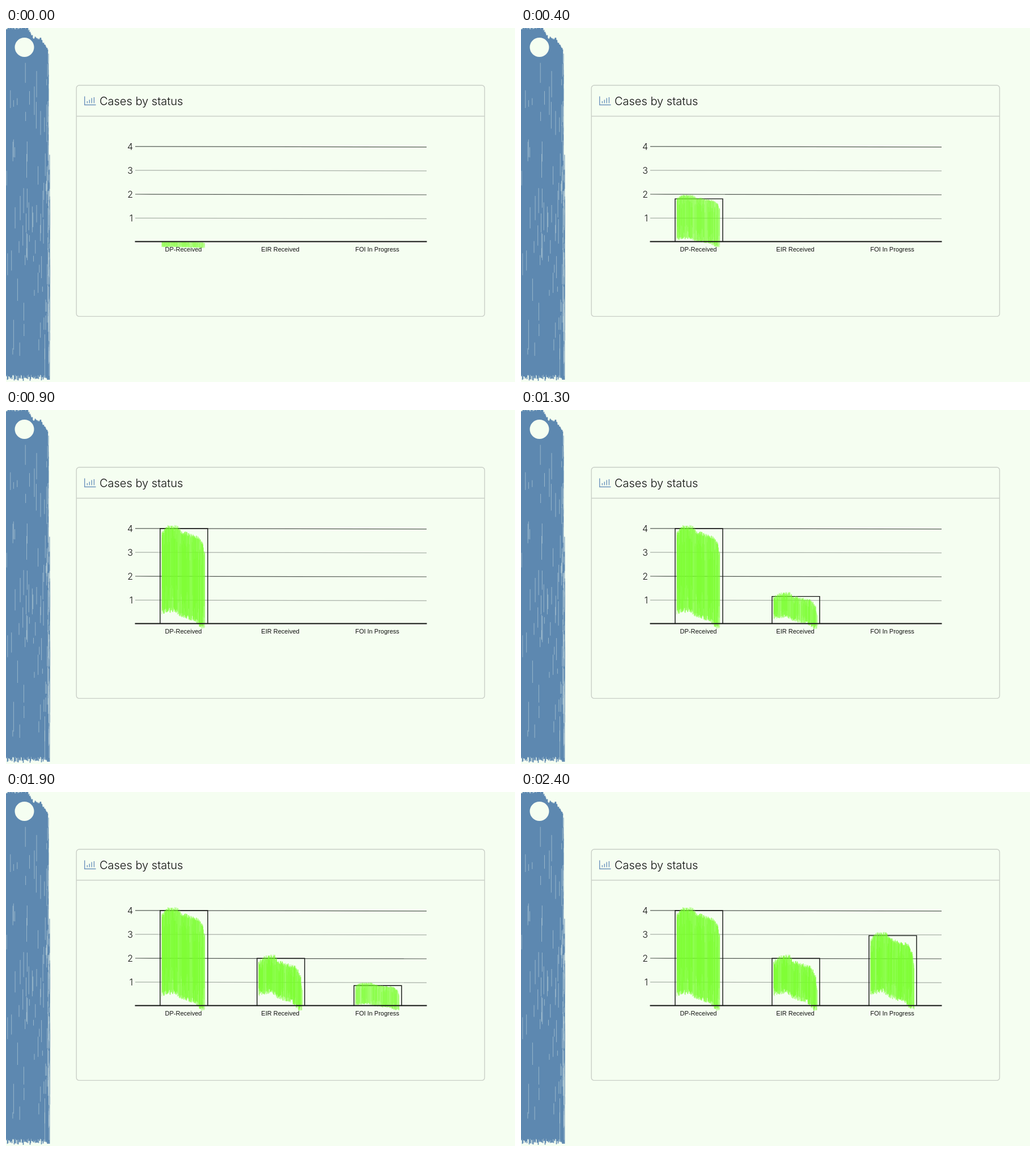
An HTML page for the animation above (2.5 s loop, 898 by 624 pixels).

```html
<!DOCTYPE html>
<html lang="en">
<head>
<meta charset="utf-8">
<title>Cases by status</title>
<style>
  html, body { margin: 0; width: 100%; height: 100%; overflow: hidden; background: #f5fef1; }
  svg { display: block; width: 898px; height: 624px; }
  .title, .axis { font-family: Inter, "Liberation Sans", sans-serif; font-weight: 300; fill: #111; }
  .title { font-size: 20px; }
  .axis { font-size: 16px; text-anchor: end; }
  .label { font: 11px "Liberation Sans", Arial, sans-serif; fill: #111; text-anchor: middle; }
  .card { fill: none; stroke: #c9cfc7; stroke-width: 1.4; }
  .icon { fill: none; stroke: #6c92bd; stroke-width: 1.4; }
  .outline { fill: none; stroke: #111; stroke-width: 1.4; }
  .base { stroke: #111; stroke-width: 2.2; }
</style>
</head>
<body>
<svg viewBox="0 0 898 624">
  <g id="sidebar"></g>
  <circle cx="32.5" cy="34" r="17" fill="#f5fef1"/>

  <rect class="card" x="124.2" y="101" width="720.2" height="407.4" rx="5"/>
  <path class="card" d="M124 155.5H844.4"/>
  <path class="icon" d="M138.7 120.5V135.5H158.5M143.4 129V132.5M147.3 126.5V132.5M151.2 123.5V132.5M155.4 122V132.5"/>
  <text class="title" x="165" y="136">Cases by status</text>

  <g id="grid"></g>
  <g id="labels"></g>
  <g id="bars"></g>
  <path class="base" d="M227.5 376.5H742.5"/>
</svg>
<script>
const LOOP = 2500, STEP = 100, FLOOR = 376.5, PITCH = 171;
const GREEN = '#78ff2b', BLUE = '#5d88b0', PAPER = '#f5fef1';
const $ = id => document.getElementById(id);

function add(parent, tag, attrs, text) {
  const el = document.createElementNS('http://www.w3.org/2000/svg', tag);
  for (const key in attrs) el.setAttribute(key, attrs[key]);
  if (text) el.textContent = text;
  parent.appendChild(el);
  return el;
}

function seeded(seed) {
  return () => {
    seed = (seed * 1664525 + 1013904223) >>> 0;
    return seed / 4294967296;
  };
}

const clamp = v => Math.max(0, Math.min(1, v));
const segment = (x, y1, y2) => `M${x.toFixed(1)} ${y1.toFixed(1)}V${y2.toFixed(1)}`;

// Piecewise linear curve through [x, y] points
function curve(points, x) {
  let i = 1;
  while (i < points.length - 1 && points[i][0] < x) i++;
  const [x0, y0] = points[i - 1], [x1, y1] = points[i];
  return y0 + (y1 - y0) * clamp((x - x0) / (x1 - x0));
}

function drawSidebar() {
  const rnd = seeded(11), g = $('sidebar');
  const top = [[0, 4], [3, 0], [38, 0], [48, 16], [62, 19], [74, 38]];
  let body = '', fringe = '', streaks = '';
  for (let x = 0.5; x < 74; x++) {
    body += segment(x, curve(top, x) + rnd() * 5 - 2, 611 + rnd() * 11);
  }
  for (let i = 0; i < 90; i++) {
    const y = 40 + rnd() * 560;
    const reach = y > 220 ? 4 : 2;
    fringe += segment(73 + rnd() * reach, y, Math.min(620, y + 20 + rnd() * 120));
  }
  // Dry streaks crowd towards the right edge
  for (let i = 0; i < 130; i++) {
    const y = 40 + rnd() * 530;
    streaks += segment(76 * (1 - rnd() ** 4), y, y + 8 + rnd() * 45);
  }
  add(g, 'path', { d: body, stroke: BLUE, 'stroke-width': 1.6 });
  add(g, 'path', { d: fringe, stroke: BLUE, 'stroke-width': 1 });
  add(g, 'path', { d: streaks, stroke: PAPER, 'stroke-width': 0.6, opacity: 0.65 });
}

function drawGrid() {
  for (let n = 1; n <= 4; n++) {
    const y = FLOOR + 0.7 - n * 42.1, dark = n % 2 === 0;
    add($('grid'), 'path', {
      d: `M228 ${y}L742 ${y + 1}`,
      stroke: dark ? '#555a55' : '#a9b0a8', 'stroke-width': 1.2
    });
    add($('grid'), 'text', { class: 'axis', x: 224, y: y + 5.8 }, String(n));
  }
  ['DP-Received', 'EIR Received', 'FOI In Progress'].forEach((name, i) =>
    add($('labels'), 'text', { class: 'label', x: 313 + i * PITCH, y: 394 }, name));
}

// Brush outline: [part of the width, pixels below the peak or above the foot]
const BRUSH_TOP = [[0, 12], [0.13, 1], [0.36, 0], [0.45, 10], [0.85, 20], [0.95, 36], [1, 70]];
const BRUSH_FOOT = [[0, 30], [0.28, 35], [0.45, 24], [0.75, 18], [0.9, 4], [1, 4]];
const BRUSH_WIDTH = 78;

// show: first visible time; brush and frame: start and end of growth
const bars = [
  { height: 167.5, foot: 388, show: 0, brush: [0, 840], frame: [40, 840] },
  { height: 83.3, foot: 387, show: 1000, brush: [1000, 1490], frame: [1070, 1470] },
  { height: 123.4, foot: 386, show: 1600, brush: [1690, 2390], frame: [1700, 2400] }
];

function drawBar(bar, i) {
  const rnd = seeded(31 + i), group = add($('bars'), 'g', {});
  const peak = FLOOR - bar.height - 4;
  bar.x = 271.9 + i * PITCH;
  bar.span = bar.foot - peak;
  bar.group = group;
  bar.outline = add(group, 'path', { class: 'outline' });
  bar.paint = add(group, 'g', { stroke: GREEN, fill: 'none' });
  let wash = '', bristles = '';
  for (let x = 0; x < BRUSH_WIDTH; x += 0.5) {
    const u = x / BRUSH_WIDTH;
    const y1 = peak + curve(BRUSH_TOP, u), y2 = bar.foot - curve(BRUSH_FOOT, u);
    const a = y1 + rnd() * 8 - 3, b = y2 - rnd() * 9 + 3;
    const px = bar.x + 3 + x;
    const density = (0.7 + 0.25 * Math.sin(x * 0.35 + i)) * clamp((1 - u) * 8 + 0.25);
    if (rnd() < clamp((1 - u) * 10 + 0.2)) wash += segment(px, a, b);
    if (rnd() < density) {
      const cut = (b - a) * 0.3 * rnd();
      bristles += rnd() < 0.5 ? segment(px, a + cut, b) : segment(px, a, b - cut);
    }
  }
  // Separate strokes overlap, so the paint deepens where they crowd
  add(bar.paint, 'path', { d: wash, 'stroke-width': 0.8, opacity: 0.65 });
  add(bar.paint, 'path', { d: bristles, 'stroke-width': 0.9, opacity: 0.6 });
}

function poseBar(bar, t) {
  const grown = ([from, to]) => clamp((t - from) / (to - from));
  const flat = 12 / bar.span;
  const scale = flat + (1 - flat) * grown(bar.brush);
  const h = bar.height * grown(bar.frame);
  bar.group.setAttribute('visibility', t >= bar.show ? 'visible' : 'hidden');
  bar.paint.setAttribute('transform', `translate(0 ${bar.foot * (1 - scale)}) scale(1 ${scale})`);
  bar.outline.setAttribute('d', h ? `M${bar.x} ${FLOOR}v${-h}h84v${h}` : '');
}

drawSidebar();
drawGrid();
bars.forEach(drawBar);

const start = performance.now();
function tick() {
  const t = Math.floor((performance.now() - start) % LOOP / STEP) * STEP;
  bars.forEach(bar => poseBar(bar, t));
  requestAnimationFrame(tick);
}
tick();
</script>
</body>
</html>
```
